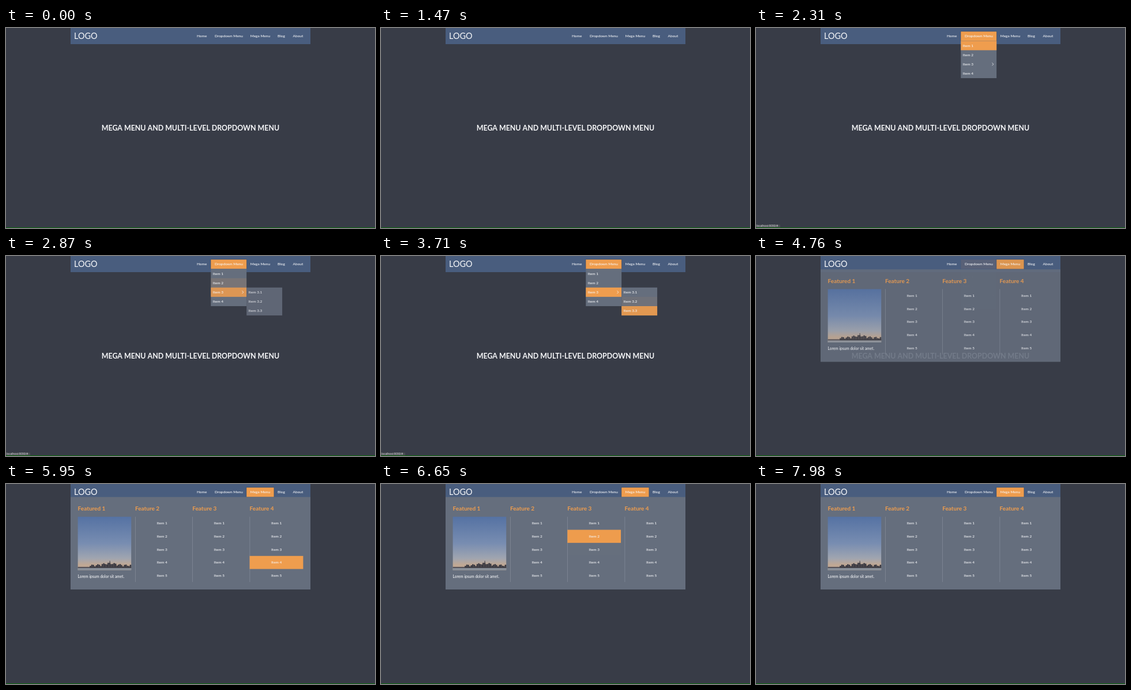
Animation, 640 px wide and 347 px high, one loop 8 s. Source, as an HTML page with a canvas:

```html
<!DOCTYPE html>
<html lang="en">
<head>
<meta charset="utf-8">
<title>Mega menu</title>
<style>
html, body { margin: 0; width: 100%; height: 100%; overflow: hidden; background: #383c47; }
canvas { display: block; width: 640px; height: 347px; }
</style>
</head>
<body>
<canvas id="stage"></canvas>
<script>
const LOOP = 8000, FADE = 300;
const ORANGE = '#ef9d4e', PANEL = '#656e7d', WHITE = '#f6f7f9';
const FONT = 'Lato, "Open Sans", sans-serif';
const canvas = document.getElementById('stage');
const ctx = canvas.getContext('2d');
const dpr = window.devicePixelRatio || 1;
canvas.width = 640 * dpr;
canvas.height = 347 * dpr;

// Pointer path: a menu is open while the hovered id starts with its id.
const hovers = [
  [1540, 'D'], [2000, 'D1'], [2450, 'D2'], [2700, 'D3'],
  [3220, 'D31'], [3380, 'D32'], [3520, 'D33'],
  [4130, 'D32'], [4200, 'D31'], [4270, 'D3'], [4320, 'D2'], [4380, 'D1'], [4430, 'D'],
  [4575, 'M'], [5180, 'M41'], [5340, 'M42'], [5480, 'M43'], [5620, 'M44'],
  [6200, 'M43'], [6300, 'M33'], [6380, 'M32'],
  [6800, 'M22'], [7000, 'M21'], [7140, 'M']
];

const nav = [
  { text: 'Home', id: 'H', x: 331, left: 324.8, right: 355.3 },
  { text: 'Dropdown Menu', id: 'D', x: 362, left: 355.3, right: 417.2 },
  { text: 'Mega Menu', id: 'M', x: 423.7, left: 417.2, right: 464.6 },
  { text: 'Blog', id: 'B', x: 471, left: 464.6, right: 491.2 },
  { text: 'About', id: 'A', x: 497.6, left: 491.2, right: 522 }
];

// CSS "ease": cubic-bezier(.25, .1, .25, 1)
function ease(x) {
  if (x <= 0) return 0;
  if (x >= 1) return 1;
  let lo = 0, hi = 1, s = 0.5;
  for (let i = 0; i < 20; i++) {
    s = (lo + hi) / 2;
    const bx = 0.75 * s * (1 - s) + s * s * s;
    if (bx < x) lo = s; else hi = s;
  }
  return 0.3 * s * (1 - s) * (1 - s) + 3 * s * s * (1 - s) + s * s * s;
}

// Transition level (0..1) of one element at time t
function level(id, t) {
  let from = 0, to = 0, start = -FADE;
  const at = time => from + (to - from) * ease((time - start) / FADE);
  for (const [time, path] of hovers) {
    if (time > t) break;
    const goal = path.startsWith(id) ? 1 : 0;
    if (goal !== to) {
      from = at(time);
      to = goal;
      start = time;
    }
  }
  return at(t);
}

function box(x, y, w, h, color, alpha = 1) {
  if (alpha <= 0) return;
  ctx.save();
  ctx.globalAlpha *= alpha;
  ctx.fillStyle = color;
  ctx.fillRect(x, y, w, h);
  ctx.restore();
}

function label(text, x, y, size = 6.5, { weight = 500, color = WHITE, align = 'left', font = FONT } = {}) {
  ctx.font = `${weight} ${size}px ${font}`;
  ctx.fillStyle = color;
  ctx.textAlign = align;
  ctx.fillText(text, x, y);
}

// Draw a panel faded and lowered while it opens
function panel(amount, slide, draw) {
  if (amount <= 0.002) return;
  ctx.save();
  ctx.globalAlpha = amount;
  ctx.translate(0, slide * (1 - amount));
  draw();
  ctx.restore();
}

function list(prefix, names, x, y, t) {
  box(x, y, 61.9, names.length * 16.15, PANEL);
  names.forEach((name, i) => {
    const top = y + i * 16.15;
    box(x, top, 61.9, 16.15, ORANGE, level(prefix + (i + 1), t));
    label(name, x + 3.4, top + 10.4);
  });
}

function chevron(x, y) {
  ctx.beginPath();
  ctx.moveTo(x, y - 2.4);
  ctx.lineTo(x + 2.3, y);
  ctx.lineTo(x, y + 2.4);
  ctx.strokeStyle = WHITE;
  ctx.lineWidth = 0.8;
  ctx.stroke();
}

function dropdown(t) {
  panel(level('D', t), 6, () => {
    list('D', ['Item 1', 'Item 2', 'Item 3', 'Item 4'], 355.3, 22.4, t);
    chevron(409.5, 62.8);
  });
  panel(level('D3', t) * level('D', t), 0, () =>
    list('D3', ['Item 3.1', 'Item 3.2', 'Item 3.3'], 417.2, 54.7, t));
}

function photo(x, y, size) {
  const sky = ctx.createLinearGradient(0, y, 0, y + size);
  sky.addColorStop(0, '#5572a3');
  sky.addColorStop(0.5, '#788db1');
  sky.addColorStop(0.78, '#a0a5b0');
  sky.addColorStop(0.9, '#c0a894');
  box(x, y, size, size, sky);
  const base = y + 89;
  box(x, base - 2, size, 2.5, '#514c52');
  for (let i = 0; i < 36; i++) {
    const u = i / 35;
    const h = 2 + 4 * Math.abs(Math.sin(i * 2.3)) + 3.5 * Math.exp(-((u - 0.6) ** 2) / 0.03);
    if (u > 0.2) box(x + u * (size - 2.6), base - h, 2.6, h, '#3c3b43');
  }
  box(x + 55, base - 12.5, 1, 10, '#3c3b43');
  box(x, base, size, size - 89, '#89909a');
}

function mega(t) {
  panel(level('M', t), 6, () => {
    box(112, 22.6, 416, 160.4, PANEL);
    const bold = { weight: 700, color: ORANGE };
    label('Featured 1', 124.6, 46.4, 10, bold);
    photo(124.6, 56.8, 92.6);
    label('Lorem ipsum dolor sit amet.', 124.6, 162.7, 6.6);
    for (let c = 2; c <= 4; c++) {
      const x = 224 + (c - 2) * 99.3;
      label('Feature ' + c, x, 46.4, 10, bold);
      box(x, 56.8, 0.6, 113.3, '#8b929f');
      for (let r = 1; r <= 5; r++) {
        const y = 56.8 + (r - 1) * 22.67;
        box(x, y, 92.8, 22.67, ORANGE, level('M' + c + r, t));
        label('Item ' + r, x + 46.6, y + 13.6, 6.5, { align: 'center' });
      }
    }
  });
}

function render(t) {
  ctx.setTransform(dpr, 0, 0, dpr, 0, 0);
  box(0, 0, 640, 347, '#383c47');
  label('MEGA MENU AND MULTI-LEVEL DROPDOWN MENU', 320, 178.4, 12.4, { weight: 700, align: 'center' });
  box(112, 0, 416, 28, '#495d7e');
  label('LOGO', 118, 18.7, 14.4, { weight: 400 });
  for (const item of nav) {
    const w = item.right - item.left, on = level(item.id, t);
    box(item.left - 0.6, 5.6, w + 1.2, 17, '#34415a', on * 0.7);
    box(item.left, 6.2, w, 16.3, ORANGE, on);
    label(item.text, item.x, 16.3);
  }
  dropdown(t);
  mega(t);
  if (t >= hovers[0][0] && t < 4575) {
    box(0, 341.3, 42, 5, '#4a4d53');
    label('localhost:9090/#', 1, 345.4, 4.8, { weight: 400, color: '#d5d7da', font: '"Noto Sans", sans-serif' });
  }
  box(0, 346, 640, 1, '#0b680d');
}

const begin = performance.now();
function tick() {
  render((performance.now() - begin) % LOOP);
  requestAnimationFrame(tick);
}
tick();
</script>
</body>
</html>
```
